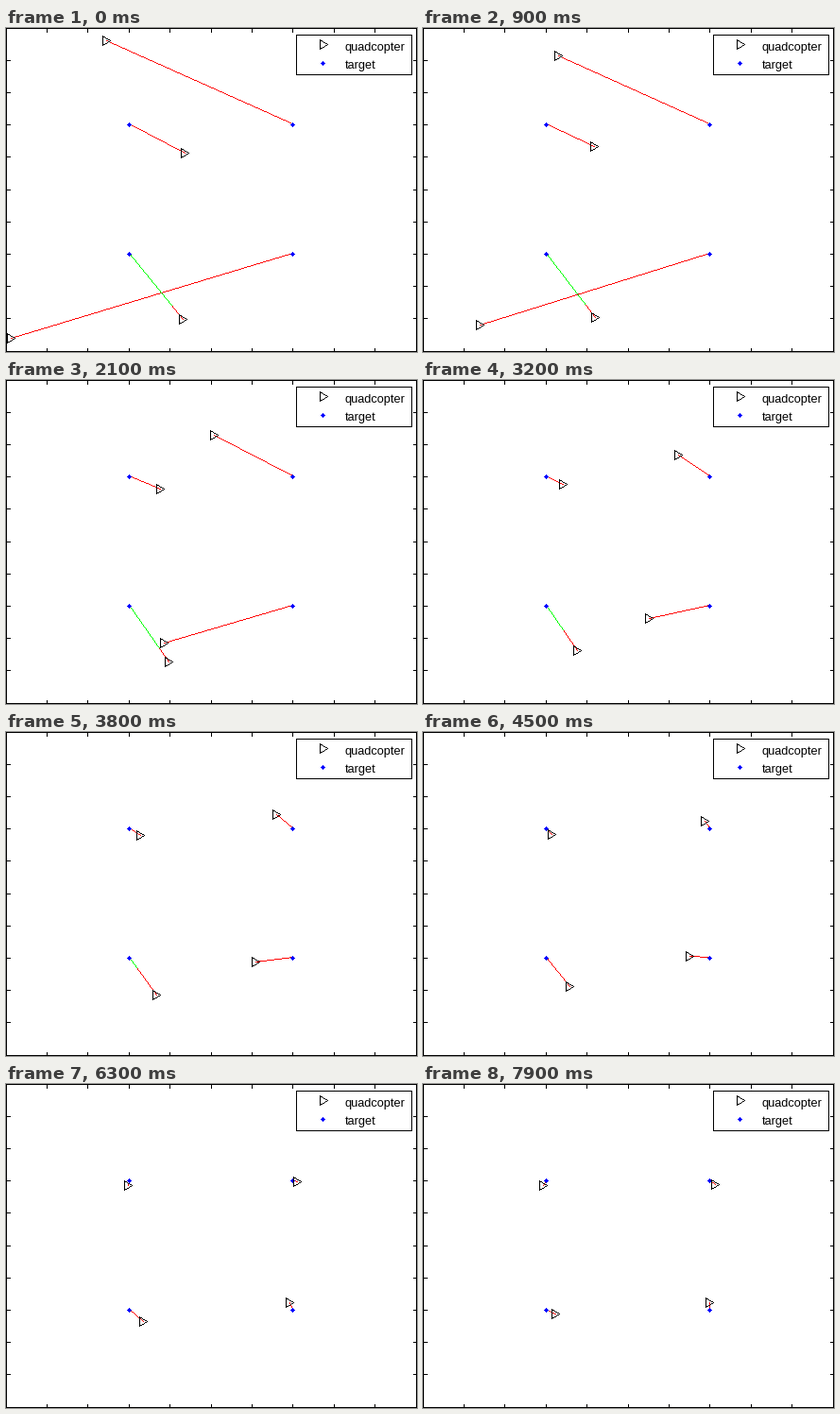
A matplotlib script that plays this animation: 435 by 343 pixels, repeating every 8000 ms.

```python
import numpy as np
import matplotlib.pyplot as plt
from matplotlib.animation import FuncAnimation
from matplotlib.patches import Rectangle

W, H, DPI = 435, 343, 64
PX = 72 / DPI  # one pixel in points
FRAMES, STEP = 80, 100


class Copter:
    """Flies from start to end, slowing down as exp(-(t / tau) ** power)."""

    def __init__(self, target, start, end, tau, power):
        self.target = np.array(target)
        self.start, self.end = np.array(start), np.array(end)
        self.tau, self.power = np.array(tau), np.array(power)

    def at(self, t):
        left = np.exp(-(t / self.tau) ** self.power)
        return np.rint(self.end + (self.start - self.end) * left)


COPTERS = [
    Copter((303, 102), (106, 14), (309, 108), (2.36, 2.8), (1.65, 1.45)),
    Copter((303, 239), (5, 329), (303, 231.5), (2.44, 2.53), (1.6, 1.77)),
    Copter((130, 102), (189, 133), (126, 108), (3.1, 1.92), (1.6, 1.47)),
    Copter((130, 239), (187, 309), (131, 240), (5.0, 4.9), (1.35, 2.2)),
]


def green_share(t):
    """Part of the last route, from its target, that is still green."""
    return max(0, .8 * (1 - (t / 4.3) ** 4))


fig = plt.figure(figsize=(W / DPI, H / DPI), dpi=DPI, facecolor="white")
ax = fig.add_axes([0, 0, 1, 1])
ax.set_xlim(0, W)
ax.set_ylim(H, 0)
ax.axis("off")


def pixels(*points):
    """Hard-edged pixel run along a polyline."""
    runs = []
    for a, b in zip(points, points[1:]):
        n = int(np.abs(np.subtract(b, a)).max()) + 1
        runs.append(np.linspace(a, b, n))
    return np.floor(np.concatenate(runs) + .5).T


def triangle(x, y):
    return pixels((x - 4, y - 5), (x + 4, y), (x - 4, y + 5), (x - 4, y - 5))


def trace(color, z, xy=((), ())):
    return ax.plot(*xy, ",", color=color, zorder=z)[0]


def block(x, y, w, h, color, z):
    ax.add_patch(Rectangle((x, y), w, h, fc=color, lw=0, aa=False, zorder=z))


def box(x, y, w, h, z):
    block(x, y, w, h, "black", z)
    block(x + 1, y + 1, w - 2, h - 2, "white", z)


def dot(x, y, z):
    for r in range(3):
        block(x - r, y - 2 + r, 2 * r + 1, 5 - 2 * r, "blue", z)


# Axes box with ticks on all four sides
box(0, 0, W, H, 1)
for k in range(1, 10):
    x, y = k * (W - 1) // 10, k * (H - 1) // 10
    block(x, 0, 1, 5, "black", 2)
    block(x, H - 4, 1, 4, "black", 2)
    block(0, y, 5, 1, "black", 2)
    block(W - 4, y, 4, 1, "black", 2)

for c in COPTERS:
    dot(*c.target, 5)

# Legend
box(307, 7, 123, 43, 8)
trace("black", 9, triangle(336, 18))
dot(335, 37, 9)
for label, base in (("quadcopter", 24), ("target", 43)):
    ax.text(358.5, base, label, family="Liberation Sans", size=12.8 * PX,
            va="baseline", ha="left", color="black", zorder=9)

routes = [trace("red", 3) for _ in COPTERS]
green = trace("#00ff00", 4)
marks = [trace("black", 6) for _ in COPTERS]


def update(n):
    t = n * STEP / 1000
    for c, route, mark in zip(COPTERS, routes, marks):
        pos = c.at(t)
        route.set_data(*pixels(c.target, pos))
        mark.set_data(*triangle(*pos))
    # The last route is green from its target up to the split
    share = green_share(t)
    xs, ys = routes[-1].get_data()
    keep = int(len(xs) * share)
    green.set_data(xs[:keep], ys[:keep])
    return [*routes, green, *marks]


anim = FuncAnimation(fig, update, frames=FRAMES, interval=STEP,
                     repeat=True, repeat_delay=0, blit=False)
plt.show()
```
